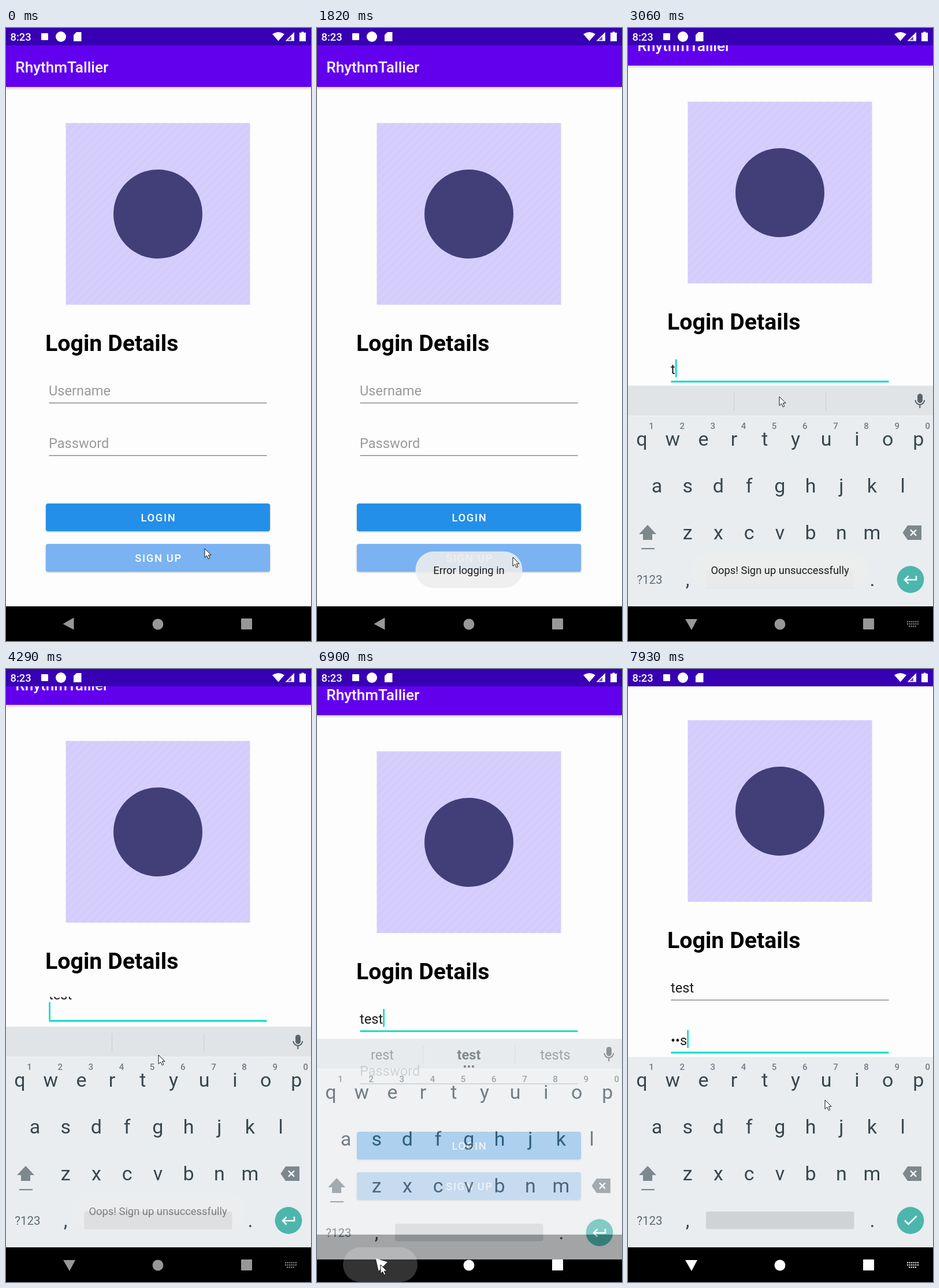
These frames come from a looping animation (528 px wide and 1061 px high, 7.99 s). An HTML page:

```html
<!DOCTYPE html>
<html lang="en">
<head>
<meta charset="utf-8">
<title>Login screen</title>
<style>
  html, body { margin: 0; width: 528px; height: 1061px; overflow: hidden; background: #000; }
  svg { display: block; font-family: Roboto, sans-serif; }
  .mid { text-anchor: middle; }
  .medium { font-weight: 500; }
  .bold { font-weight: 700; }
  .button { filter: drop-shadow(0 1.5px 1.5px rgba(0, 0, 0, .28)); }
  .label { font-size: 18.35px; font-weight: 500; letter-spacing: 1.64px; fill: #fff; text-anchor: middle; }
  .field { font-size: 23.6px; }
  .key { font-size: 34px; fill: #37474f; text-anchor: middle; }
  .digit { font-size: 15px; font-weight: 500; fill: #737c81; text-anchor: middle; }
  .word { font-size: 23.6px; fill: #747d81; text-anchor: middle; }
  .toast rect { fill: #eee; fill-opacity: .89; }
  .toast text { font-size: 18.35px; fill: #1c1c1c; text-anchor: middle; }
</style>
</head>
<body>
<svg width="528" height="1061" viewBox="0 0 528 1061">
  <defs>
    <pattern id="stripes" width="10" height="10" patternUnits="userSpaceOnUse" patternTransform="rotate(45)">
      <rect width="10" height="10" fill="#d6cffe"/><rect width="4" height="10" fill="#d3ccfb"/>
    </pattern>
    <clipPath id="signClip"><rect x="69" y="893" width="388" height="48" rx="4"/></clipPath>
    <clipPath id="nameClip"><rect x="70" y="607.5" width="390" height="45"/></clipPath>
  </defs>

  <g id="page">
    <rect width="528" height="1140" fill="#fdfdfd"/>
    <rect y="30" width="528" height="72" fill="#6200ee" style="filter:drop-shadow(0 2px 2px rgba(0,0,0,.22))"/>
    <text class="medium" x="16.3" y="76.5" font-size="26.2" fill="#fff">RhythmTallier</text>
    <rect x="103.5" y="164.5" width="319" height="314.5" fill="url(#stripes)"/>
    <circle cx="263" cy="322" r="77" fill="#423f78"/>
    <text class="bold" x="68" y="559" font-size="39.3">Login Details</text>

    <g clip-path="url(#nameClip)"><text id="name" class="field" x="74" y="636"/></g>
    <rect id="composing" x="74.5" y="638.5" height="1.5" fill="#222"/>
    <line id="nameLine" x1="74.5" x2="451.5" y1="649" y2="649"/>
    <text id="pass" class="field" x="74" y="726.5"/>
    <line id="passLine" x1="74.5" x2="451.5" y1="740" y2="740"/>
    <rect id="caret" width="2.6" height="31" fill="#03dac5"/>

    <rect class="button" x="69" y="823" width="388" height="48" rx="4" fill="#238fe9"/>
    <text class="label" x="264" y="854.2">LOGIN</text>
    <rect class="button" x="69" y="893" width="388" height="48" rx="4" fill="#7ab2f2"/>
    <g clip-path="url(#signClip)"><circle id="ripple" cx="339" cy="917" fill="#fff"/></g>
    <text class="label" x="264" y="924.2">SIGN UP</text>
    <rect y="1001" width="528" height="140"/>
  </g>

  <g id="keyboard">
    <g id="strip">
      <rect y="619" width="528" height="53" fill="#e0e4e7"/>
      <path d="M183.5 631v31M342.5 631v31" stroke="#c9ced1"/>
      <g id="words">
        <text class="word" x="113" y="655">rest</text>
        <text class="word bold" x="263" y="655" style="fill:#4d595e">test</text>
        <text class="word" x="412.5" y="655">tests</text>
        <g fill="#4d595e"><circle cx="256" cy="667" r="2.2"/><circle cx="263" cy="667" r="2.2"/><circle cx="270" cy="667" r="2.2"/></g>
      </g>
      <rect x="501" y="633" width="9" height="16" rx="4.5" fill="#5a666b"/>
      <path d="M497.5 644a7.8 7.8 0 0 0 15.6 0M505.3 652v6" fill="none" stroke="#5a666b" stroke-width="2.2"/>
    </g>
    <rect y="671" width="528" height="330" fill="#e9edf0"/>
    <path d="M0 671.5h528" stroke="#f1f4f6"/>
    <g id="keys"></g>
    <path d="M34 860l15 16h-7v10h-16v-10h-7zM23 900h23v2.2h-23z" fill="#7d888d"/>
    <path d="M475.5 873.5l8.5-12.500h24v25h-24z" fill="#7d888d"/>
    <path d="M489 868.5l10 10m0-10l-10 10" stroke="#fff" stroke-width="2.4"/>
    <text x="37.5" y="962" font-size="20.5" fill="#5f6b70" class="mid">?123</text>
    <rect x="135" y="939" width="256.5" height="30.5" rx="4" fill="#cfd3d6"/>
    <circle cx="489" cy="954.5" r="23.4" fill="#4db6ac"/>
    <path id="enter" fill="none" stroke="#fff" stroke-width="2.6"/>
    <rect y="1001" width="528" height="140"/>
  </g>

  <rect width="528" height="30" fill="#3700b3"/>
  <g fill="#fff">
    <text class="medium" x="7.5" y="21.5" font-size="18.35">8:23</text>
    <rect x="61" y="9" width="12" height="12" rx="1"/>
    <circle cx="95" cy="15" r="9"/>
    <path d="M122 7h8.500v16h-13.500v-11z"/>
    <path d="M461 10.500q10.500-7 21 0l-10.500 12z"/>
    <path d="M499 7v15.500h-15.500zM511.500 8v-1.500h4v1.500h3.500v15h-11v-15z"/>
    <path d="M494 14.500v6.500h-6.500z" fill="#3700b3" opacity=".7"/>
  </g>

  <rect id="pill" x="45" y="1001" width="129" height="60" rx="30" fill="#fff"/>
  <g id="nav">
    <path id="back" d="M-11 .5l19-11v21z"/>
    <circle cx="263" cy="1032" r="9.4"/>
    <rect x="407" y="1022" width="19" height="19" rx="1"/>
    <path id="imeIcon" d="M483 1027.500h20M483 1031.500h20M486 1035.500h14" fill="none" stroke-width="2.2" stroke-dasharray="2.2 1.36"/>
  </g>

  <g id="errorToast" class="toast">
    <rect x="170.500" y="906" width="185" height="63.5" rx="31.700"/><text x="263" y="945">Error logging in</text>
  </g>
  <g id="oopsToast" class="toast">
    <rect x="112" y="906" width="302.5" height="63.5" rx="31.700"/><text x="263" y="945">Oops! Sign up unsuccessfully</text>
  </g>
  <path id="pointer" d="M0 0v15.500l3.700-3.300 2.600 5.600 2.500-1.100-2.500-5.500h4.800z" fill="#fff" stroke="#111"/>
</svg>
<script>
const LOOP = 7990;
const $ = id => document.getElementById(id);
const set = (id, attrs) => { for (const k in attrs) $(id).setAttribute(k, attrs[k]); };
const ramp = (t, from, to) => Math.min(1, Math.max(0, (t - from) / (to - from)));
const between = (t, from, to) => t >= from && t < to;

const addKey = (cls, char, x, y) =>
  $('keys').insertAdjacentHTML('beforeend', `<text class="${cls}" x="${x}" y="${y}">${char}</text>`);
[['qwertyuiop', 24], ['asdfghjkl', 50], ['zxcvbnm', 103.3]].forEach(([row, x], r) =>
  [...row].forEach((c, i) => addKey('key', c, x + 53.2 * i, 722.7 + 81 * r)));
[...'1234567890'].forEach((c, i) => addKey('digit', c, 40.5 + 53.15 * i, 693.5));
addKey('key', ',', 103, 966);
addKey('key', '.', 423, 966);

const NAME_TYPED = [3060, 3260, 3460, 3660], PASS_TYPED = [7720, 7820, 7925];
const NEWLINE = 4090, ERASE = 5450, FOCUS = 2200, PASS_FOCUS = 7450;
const caretResets = [FOCUS, ...NAME_TYPED, NEWLINE, ERASE, PASS_FOCUS, ...PASS_TYPED];
const ENTER = 'M499 948v7h-20m6.5-6.5l-6.5 6.5 6.5 6.5', CHECK = 'M479 954.5l6.5 6.5 14-14';

// time, x, y of the pointer tip
const route = [
  [0, 344, 901], [30, 344, 901], [500, 339, 916], [1820, 339, 916], [2150, 262, 638],
  [3060, 262, 638], [3830, 264, 668], [4300, 264, 668], [4670, 202, 668], [4730, 202, 668],
  [4850, 194, 822], [5030, 194, 822], [5750, 164, 1029], [5840, 164, 1029], [6550, 110, 1031],
  [6950, 110, 1031], [7400, 337, 722], [7480, 337, 722], [7930, 341, 746], [LOOP, 341, 746]
];
function pointerAt(t) {
  const i = route.findIndex(p => p[0] > t);
  const a = route[i - 1], b = route[i], k = ramp(t, a[0], b[0]), e = k * k * (3 - 2 * k);
  return [a[1] + (b[1] - a[1]) * e, a[2] + (b[2] - a[2]) * e];
}

function drawField(id, text, hint, focused) {
  $(id).textContent = text || hint;
  set(id, { fill: text ? '#1c1c1c' : '#9a9a9a' });
  set(id + 'Line', { stroke: focused ? '#03dac5' : '#8a8a8a', 'stroke-width': focused ? 2.8 : 1.4 });
  return text ? $(id).getComputedTextLength() : 0;
}

function draw(t) {
  const onPass = t >= PASS_FOCUS, newline = between(t, NEWLINE, ERASE);
  const shown = ramp(t, 2250, 2550) - ramp(t, 6800, 7050) + ramp(t, 7480, 7690);
  const hidden = 1 - shown;
  const pan = onPass ? -76 : newline ? -40 : -37;
  set('page', { transform: `translate(0 ${pan * shown})` });
  set('keyboard', { transform: `translate(0 ${52 * hidden})`, opacity: 1 - hidden ** 1.3 });
  set('strip', { visibility: onPass ? 'hidden' : 'visible' });
  set('enter', { d: onPass ? CHECK : ENTER });

  const name = 'test'.slice(0, NAME_TYPED.filter(k => k <= t).length);
  const count = PASS_TYPED.filter(k => k <= t).length;
  const pass = count ? '•'.repeat(count - 1) + 'tes'[count - 1] : '';
  const nameWidth = drawField('name', name, 'Username', t >= FOCUS && !onPass);
  const passWidth = drawField('pass', pass, 'Password', onPass);
  set('name', { y: newline ? 612 : 636 });

  const suggesting = name === 'test' && !newline;
  set('words', { visibility: suggesting && !onPass ? 'inherit' : 'hidden' });
  set('composing', { width: suggesting && t < 6800 ? nameWidth : 0 });

  const reset = Math.max(...caretResets.filter(k => k <= t));
  const lit = t >= FOCUS && Math.floor((t - reset) / 500) % 2 === 0;
  set('caret', {
    x: 74.2 + (onPass ? passWidth : newline ? 0 : nameWidth),
    y: onPass ? 701 : newline ? 616.5 : 610.5,
    opacity: lit ? 1 : 0
  });

  set('ripple', { r: 400 * ramp(t, 920, 1120), opacity: .24 * (1 - ramp(t, 1100, 1210)) });
  set('pill', { opacity: .2 * (ramp(t, 6670, 6780) - ramp(t, 6950, 7150)) });
  const turn = ramp(t, 2520, 2720) - ramp(t, 6850, 7120) + ramp(t, 7500, 7700);
  set('back', { transform: `translate(109.5 1031) rotate(${-90 * turn})` });
  const tint = t < 6300 ? '#979797' : '#fff';
  set('nav', { fill: tint });
  set('imeIcon', { stroke: tint, visibility: between(t, 2500, 6850) || t > 7520 ? 'visible' : 'hidden' });

  set('errorToast', { opacity: ramp(t, 30, 500) - ramp(t, 2030, 2530) });
  set('oopsToast', { opacity: ramp(t, 2040, 2540) - ramp(t, 4040, 4540) });
  set('pointer', { transform: `translate(${pointerAt(t)})` });
}

const start = performance.now();
function tick() {
  draw((performance.now() - start) % LOOP);
  requestAnimationFrame(tick);
}
tick();
</script>
</body>
</html>
```
